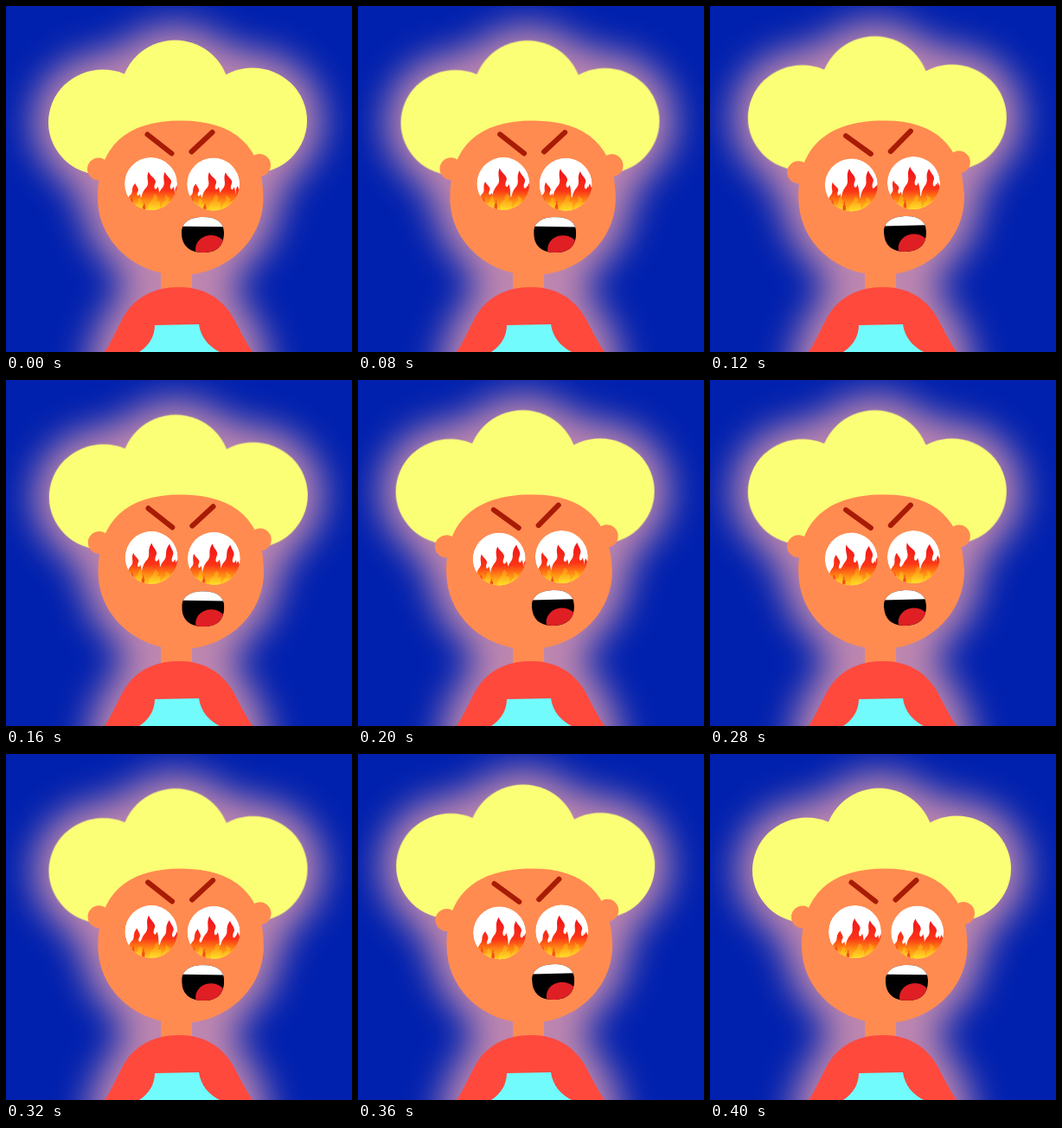
An HTML page that plays this animation: 400x400 px, repeating every 440 ms.

```html
<!DOCTYPE html>
<html lang="en">
<head>
<meta charset="utf-8">
<title>Burning rage</title>
<style>
html, body { margin: 0; width: 100%; height: 100%; overflow: hidden; background: #0021ae; }
svg { display: block; width: 100vw; height: 100vh; }
.skin { fill: #ff8b50; }
.hair { fill: #fbff75; }
.brow { stroke: #a81b05; stroke-width: 6; stroke-linecap: round; }
</style>
</head>
<body>
<svg viewBox="0 0 400 400">
  <defs>
    <!-- Grow the silhouette with rounded corners, then soften it -->
    <filter id="glow" filterUnits="userSpaceOnUse" x="-100" y="-100" width="600" height="680" color-interpolation-filters="sRGB">
      <feGaussianBlur in="SourceAlpha" stdDeviation="20"/>
      <feComponentTransfer>
        <feFuncA type="linear" slope="10" intercept="-1"/>
      </feComponentTransfer>
      <feGaussianBlur stdDeviation="20"/>
      <feComponentTransfer result="soft">
        <feFuncA type="linear" slope=".75"/>
      </feComponentTransfer>
      <feFlood flood-color="#fda9b0"/>
      <feComposite in2="soft" operator="in"/>
    </filter>
    <linearGradient id="fire" gradientUnits="userSpaceOnUse" x1="0" y1="-14" x2="0" y2="31">
      <stop offset="0" stop-color="#f2161c"/>
      <stop offset=".48" stop-color="#fb3416"/>
      <stop offset=".74" stop-color="#ff8a14"/>
      <stop offset="1" stop-color="#ffd21a"/>
    </linearGradient>
    <linearGradient id="core" gradientUnits="userSpaceOnUse" x1="0" y1="6" x2="0" y2="30">
      <stop offset="0" stop-color="#ff5a14"/>
      <stop offset=".5" stop-color="#ffa017"/>
      <stop offset="1" stop-color="#ffdc28"/>
    </linearGradient>
    <clipPath id="eyeClip"><circle r="30.5"/></clipPath>
    <clipPath id="mouthClip">
      <path d="M203 262C203 250 213 244 228 244C243 244 252 250 252 262C252 278 243 285 228 285C212 285 203 277 203 262Z"/>
    </clipPath>
    <g id="blaze">
      <path id="flames" fill="url(#fire)"/>
      <path id="cores" fill="url(#core)"/>
      <path id="sparks" fill="#f4511a"/>
    </g>
    <g id="body">
      <rect class="skin" x="179" y="296" width="36" height="40"/>
      <path fill="#ff493d" d="M114 400C123 386 127 376 134 363C147 337 171 325 200 325C229 325 250 338 263 361C270 374 276 387 285 400V480H114Z"/>
    </g>
    <g id="hair" class="hair">
      <ellipse cx="112" cy="134.5" rx="63" ry="61"/>
      <ellipse cx="195.5" cy="101.5" rx="63" ry="62"/>
      <ellipse cx="285" cy="132.5" rx="63" ry="61"/>
      <path d="M112 100H285V185H112Z"/>
    </g>
    <g id="face" class="skin">
      <circle cx="107" cy="188.5" r="13"/>
      <circle cx="293" cy="184" r="13"/>
      <path d="M106 222C106 163 138.5 132.5 201.7 132.5C265 132.5 297.5 163 297.5 222C297.5 271 255 311 201.7 311C148.500 311 106 271 106 222Z"/>
    </g>
  </defs>

  <rect width="400" height="400" fill="#0021ae"/>
  <g filter="url(#glow)">
    <use href="#body"/>
    <use href="#hair" data-part="hair"/>
    <use href="#face" data-part="head"/>
  </g>

  <use href="#hair" data-part="hair"/>
  <use href="#body"/>
  <path fill="#72fbfd" d="M154 400C165 393 172 382 172 369L223 368C225 383 235 394 247 400Z"/>
  <g data-part="head">
    <use href="#face"/>
    <g transform="translate(167.5 205.5)" clip-path="url(#eyeClip)">
      <circle r="30.5" fill="#fff"/>
      <use href="#blaze"/>
    </g>
    <g transform="translate(239.7 206)" clip-path="url(#eyeClip)">
      <circle r="30.5" fill="#fff"/>
      <use href="#blaze" x="-2"/>
    </g>
    <path class="brow" d="M163.5 148.5L191.5 170.5M238.5 146L214.5 168.5"/>
    <g clip-path="url(#mouthClip)">
      <rect x="200" y="240" width="56" height="50"/>
      <path fill="#fff" d="M200 240H256V255.3L200 254.6Z"/>
      <ellipse cx="237" cy="281" rx="18" ry="16" fill="#df1f24"/>
    </g>
  </g>
</svg>
<script>
const STEP = 40, STEPS = 11, MIDDLE = 5;
const $ = id => document.getElementById(id);
const parts = name => document.querySelectorAll(`[data-part=${name}]`);
const heads = parts('head'), hairs = parts('hair');

// One S-shaped tongue of fire; the base sits below the eye
function tongue(x, y, w, lean, base = 33) {
  const h = base - y;
  const p = (dx, dy) => `${(x + dx * w).toFixed(2)} ${(y + dy * h).toFixed(2)}`;
  return `M${p(lean, 0)}C${p(lean + .2, .13)} ${p(.95, .18)} ${p(.6, .3)}` +
    `C${p(.35, .42)} ${p(.75, .48)} ${p(.95, .36)}C${p(1.3, .55)} ${p(1.1, .85)} ${p(1, 1)}` +
    `L${p(-1, 1)}C${p(-1.15, .8)} ${p(-1.25, .58)} ${p(-.6, .42)}` +
    `C${p(.15, .28)} ${p(-.6, .2)} ${p(lean, 0)}Z`;
}

function flicker(s) {
  const a = 2 * Math.PI * s / STEPS;
  const wave = (n, phase) => Math.cos(n * a + phase);
  const left = [-19.5 + wave(1, 2), -3.5 + 3 * wave(1, 0)];
  const mid = [-1.5 + wave(2, 1), -16.5 + 2.5 * wave(2, 0)];
  const right = [18.5 + wave(2, 3), -14.5 + 1.5 * wave(1, 1)];
  $('flames').setAttribute('d',
    tongue(...left, 7.5, .1 + .25 * wave(1, 1)) +
    tongue(...mid, 9.5, -.1 + .2 * wave(2, 2)) +
    tongue(...right, 9, .1 + .25 * wave(1, 3)) +
    tongue(29, 1 + 2 * wave(2, 1), 5, .2) +
    'M-32 19Q0 12 32 17V34H-32Z');
  $('cores').setAttribute('d',
    tongue(-14, 15 + 2 * wave(1, 1), 5, .2) +
    tongue(4 + wave(1, 2), 12 + 2 * wave(2, 2), 6, .3) +
    tongue(18, 14 + 2 * wave(1, 3), 5, -.2));
  $('sparks').setAttribute('d',
    tongue(-9 + wave(1, 0), 20 + 2 * wave(2, 0), 1.6, .3, 30) +
    tongue(-22 + wave(1, 2), 15 + 2 * wave(1, 3), 1.5, -.3, 24));
}

// The head trembles: almost half a turn of the wave per step
const tremble = s => -.98 - 1.34 * Math.cos((Math.PI - .15) * (s - MIDDLE));

function pose(s) {
  const tilt = tremble(s);
  heads.forEach(el => el.setAttribute('transform', `rotate(${tilt} 200 313)`));
  hairs.forEach(el => el.setAttribute('transform',
    `translate(${tilt * 2.25} ${tilt * 2}) rotate(${-tilt * .2} 196 120)`));
  flicker(s);
}

let last = -1;
function tick() {
  const s = Math.floor(performance.now() / STEP) % STEPS;
  if (s !== last) pose(last = s);
  requestAnimationFrame(tick);
}
tick();
</script>
</body>
</html>
```
